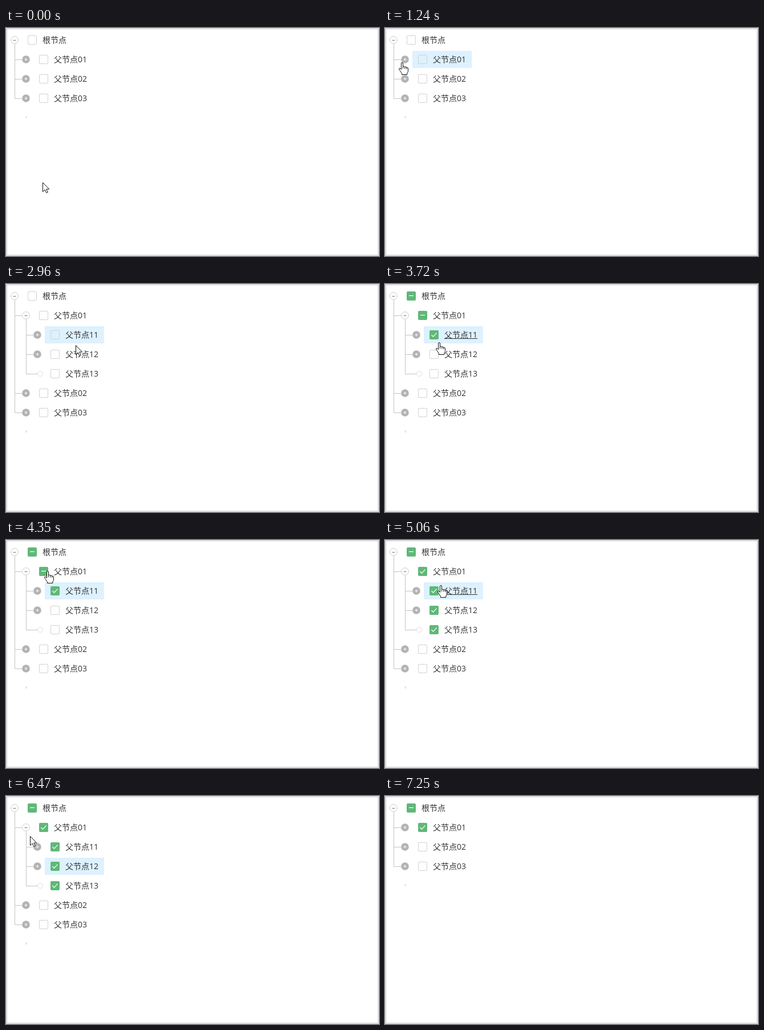
An HTML page that plays this animation: 654 by 399 pixels, repeating every 7720 ms.

```html
<!DOCTYPE html>
<html lang="zh">
<head>
<meta charset="utf-8">
<title>Tree</title>
<style>
  html, body { margin: 0; width: 100%; height: 100%; overflow: hidden; background: #fff; }
  svg { display: block; width: 654px; height: 399px; }
  text { font: 14px "Open Sans", "Noto Sans CJK SC", "Noto Sans CJK", sans-serif; fill: #333; }
  .line { fill: none; stroke: #c4c4c4; }
  .open { fill: #fff; stroke: #ccc; }
  .leaf { fill: #fff; stroke: #dedede; }
  .box { fill: none; stroke: #d2d2d2; }
  .on { fill: #5fb878; }
  .mark { fill: none; stroke: #fff; stroke-width: 1.2; }
  .cursor { fill: #fff; stroke: #111; stroke-linejoin: round; }
</style>
</head>
<body>
<svg viewBox="0 0 654 399">
  <rect x=".5" y=".5" width="653" height="398" fill="none" stroke="#ececec"/>
  <rect x="1.5" y="1.5" width="651" height="396" fill="#fff" stroke="#c6c6c6"/>
  <g id="tree"></g>
  <g id="pointer" class="cursor"></g>
</svg>
<script>
const LOOP = 7720, STEP = 77.5;
const OPEN = 1770, CHECK = 3570, CHECK_ALL = 4440, CLOSE = 6860;
const tree = document.getElementById('tree');
const pointer = document.getElementById('pointer');

// Pointer moves; bend is the sideways bulge of the way
const home = [64, 270];
const moves = [
  { from: 0, to: 840, at: [44, 47], bend: 40 },
  { from: 940, to: 1240, at: [30, 60] },
  { from: 1770, to: 2320, at: [109, 105] },
  { from: 2320, to: 2620, at: [127, 90], bend: -8 },
  { from: 2790, to: 3400, at: [88, 92], bend: -34 },
  { from: 3500, to: 3720, at: [95, 102] },
  { from: 3720, to: 4300, at: [73, 54], bend: 30 },
  { from: 4740, to: 5460, at: [140, 122] },
  { from: 5700, to: 6240, at: [44, 75], bend: 38 },
  { from: 6310, to: 6710, at: [35, 51] },
  { from: 6800, to: 7200, at: [66, 430] }
];

const ARROW = '<path d="M.5 .5V16.5L4.2 13L6.8 18.5L9.3 17.4L6.8 12H11.7Z"/>';
const HAND = '<path d="M-1.5 2Q-1.5 .5 0 .5Q1.5 .5 1.5 2V7.5Q4 6 4.8 8.2Q7.2 7 7.8 9.2Q10.5 8.4 10.5 11V15.5' +
  'Q10.3 17.5 8.8 19V21.5H-.5V19.5L-3.8 14.5Q-6.4 11.6 -5 10.5Q-3.4 9.8 -1.5 12.5Z"/>' +
  '<path d="M1.5 7.5V11M4.8 8.2V11.5M7.8 9.2V12"/>';

const smooth = k => k * k * (3 - 2 * k);

// The pointer is sampled at a fixed rate
function pointAt(time) {
  const t = Math.floor((time + 8) / STEP) * STEP;
  let [x, y] = home;
  for (const { from, to, at, bend = 0 } of moves) {
    if (t <= from) break;
    const k = Math.min(1, (t - from) / (to - from));
    const dx = at[0] - x, dy = at[1] - y;
    const side = bend * Math.sin(Math.PI * smooth(k)) / Math.hypot(dx, dy);
    x += dx * smooth(k) - dy * side;
    y += dy * smooth(k) + dx * side;
  }
  return [Math.round(x), Math.round(y)];
}

function rowsAt(t) {
  const open = t >= OPEN && t < CLOSE;
  const part = t >= CHECK ? 'minus' : '';
  const all = t >= CHECK_ALL ? 'check' : '';
  const rows = [];
  const add = (id, level, icon, mark) => rows.push({
    id, level, icon, mark,
    name: id ? '父节点' + id : '根节点',
    x: 15 + 20 * level, y: 21 + 34 * rows.length, width: id ? 58 : 42
  });
  add('', 0, 'minus', part);
  for (let i = 1; i <= 3; i++) {
    const first = i === 1;
    add('0' + i, 1, first && open ? 'minus' : 'plus', first ? all || part : '');
    if (first && open) for (let j = 1; j <= 3; j++)
      add('1' + j, 2, j < 3 ? 'plus' : 'leaf', j === 1 && part ? 'check' : all);
  }
  return rows;
}

function selectedAt(t) {
  return t < 1150 ? null : t < 2790 ? '01' : t < 5610 ? '11' : '12';
}

function icon({ icon, x, y }) {
  if (icon === 'leaf') return `<circle class="leaf" cx="${x + 5}" cy="${y}" r="4.5"/>`;
  if (icon === 'minus') return `<circle class="open" cx="${x}" cy="${y}" r="6.3"/>
    <path d="M${x - 2.5} ${y + .5}h5" stroke="#777"/>`;
  return `<circle cx="${x}" cy="${y}" r="6.8" fill="#b3b3b3"/>
    <path d="M${x - 2.5} ${y}h5M${x} ${y - 2.5}v5" stroke="#fff"/>`;
}

function checkbox({ mark, x, y }) {
  const left = x + 23;
  if (!mark) return `<rect class="box" x="${left + .5}" y="${y - 7.5}" width="15" height="15" rx="1.5"/>`;
  const d = mark === 'minus' ? `M${left + 4} ${y - .5}h8` : `M${left + 3.5} ${y}l3 3.2l6 -6.5`;
  return `<rect class="on" x="${left}" y="${y - 8}" width="16" height="16" rx="2"/><path class="mark" d="${d}"/>`;
}

// Connectors from a parent down to its children
function branch(parent, kids) {
  const x = parent.x + .5;
  const last = kids[kids.length - 1].y + .5;
  return `<path class="line" d="M${x} ${parent.y + 7}V${last}` +
    kids.map(k => `M${x} ${k.y + .5}H${k.x - (k.icon === 'leaf' ? 0 : 7)}`).join('') + '"/>';
}

function draw(t) {
  const rows = rowsAt(t), selected = selectedAt(t), [px, py] = pointAt(t);
  const kids = rows.filter(r => r.level === 2);
  const bottom = rows[rows.length - 1].y;
  let hand = false;
  let out = branch(rows[0], rows.filter(r => r.level === 1));
  if (kids.length) out += branch(rows[1], kids);
  out += `<path class="line" d="M35.5 ${bottom + 31}v4"/>`;
  for (const r of rows) {
    const { x, y, width } = r, left = x + 49;
    const dx = px - x, dy = Math.abs(py - y);
    const link = dy <= 15 && dx >= 40 && dx <= 59 + width;
    const tool = dy <= 8 && (Math.abs(dx) <= 7 && r.icon !== 'leaf' || dx >= 23 && dx < 40);
    // The toggle reacts a little beyond its rim
    hand = hand || link || tool;
    if (r.id === selected)
      out += `<rect x="${x + 13}" y="${y - 15}" width="${width + 46}" height="30" fill="#ddf1ff"/>`;
    out += icon(r) + checkbox(r) + `<text x="${left}" y="${y + 5}">${r.name}</text>`;
    if (link) out += `<rect x="${left}" y="${y + 6}" width="${width}" height="1" fill="#333"/>`;
  }
  return [out, hand ? HAND : ARROW, `translate(${px} ${py})`];
}

let shown = '';
const begin = performance.now();
function tick() {
  const [content, shape, place] = draw((performance.now() - begin) % LOOP);
  if (shown !== content + shape + place) {
    shown = content + shape + place;
    tree.innerHTML = content;
    pointer.innerHTML = shape;
    pointer.setAttribute('transform', place);
  }
  requestAnimationFrame(tick);
}
tick();
</script>
</body>
</html>
```
